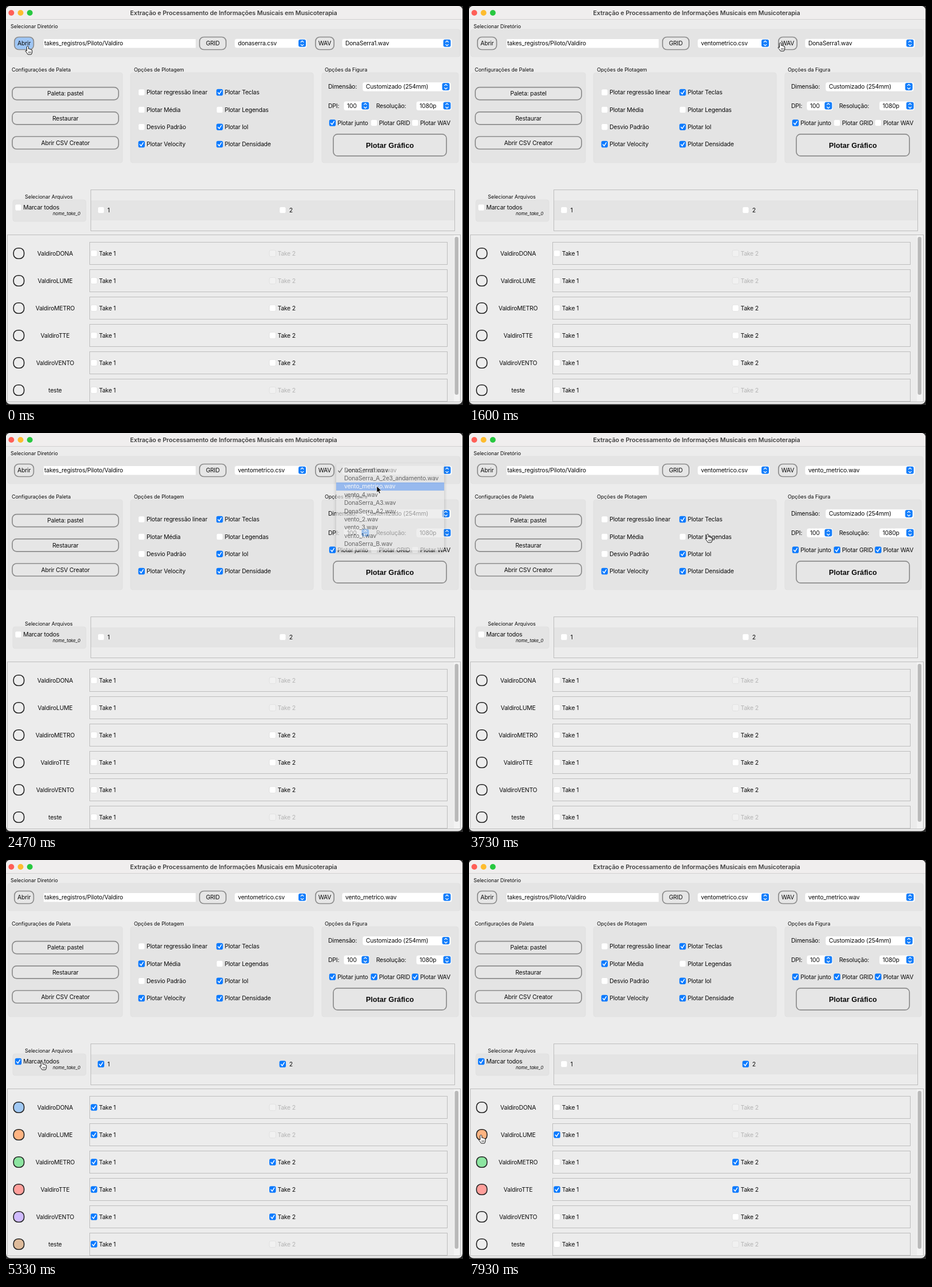
Recreate the animation shown at these times as an HTML page. Size 800 by 700 pixels, loop 8000 ms.

```html
<!DOCTYPE html>
<html lang="pt">
<head>
<meta charset="utf-8">
<style>
  html, body { margin: 0; width: 100%; height: 100%; overflow: hidden; background: #2b2b2b; }
  svg { display: block; }
  text { font: 10.4px Inter, "Open Sans", sans-serif; letter-spacing: -.18px; fill: #0a0a0a; white-space: pre; }
  text.small { font-size: 9px; letter-spacing: -.06px; }
  text.title { font-size: 10.8px; font-weight: 600; letter-spacing: -.1px; fill: #404040; }
  text.note { font-size: 7.8px; font-style: italic; letter-spacing: 0; }
  text.big { font: bold 12.7px "Liberation Sans", Arial, sans-serif; letter-spacing: 0; }
</style>
</head>
<body>
<svg width="800" height="700" viewBox="0 0 800 700">
  <defs>
    <filter id="shade" x="-10%" y="-10%" width="120%" height="125%">
      <feDropShadow dx="0" dy="3" stdDeviation="3" flood-opacity=".3"/>
    </filter>
  </defs>
  <g id="back"></g><g id="live"></g><g id="pointer"></g>
</svg>
<script>
const LOOP = 8000, ROW = 14.35;
const $ = id => document.getElementById(id);
const SIZES = { small: 9, title: 10.8, note: 7.8, big: 12.7 };

// Drawing helpers; text is placed by the middle of its capitals.
const text = (x, y, s, { cls = '', mid = false, fill = '' } = {}) =>
  `<text x="${x}" y="${y + (SIZES[cls] || 10.4) * .364}" class="${cls}"` +
  `${mid ? ' text-anchor="middle"' : ''}${fill ? ` style="fill:${fill}"` : ''}>${s}</text>`;
const rect = (x, y, w, h, fill, r = 0, more = '') =>
  `<rect x="${x}" y="${y}" width="${w}" height="${h}" rx="${r}" fill="${fill}" ${more}/>`;
const frame = (x, y, w, h) => rect(x + .5, y + .5, w, h, 'none', 0, 'stroke="#bdbdbd"');
const group = (x, y, w, h) => rect(x, y, w, h, '#e4e4e4', 4, 'stroke="#dfdfdf" stroke-width=".7"');
const button = (x, y, w, h, label, fill = '#e6e6e6', cls = '') =>
  rect(x, y, w, h, fill, 7.5, 'stroke="#8c8c8c" stroke-width="1.7"') +
  text(x + w / 2, y + h / 2, label, { mid: true, cls });
const combo = (x, y, w, label, knob) =>
  rect(x, y - 8, w, 16.5, '#fff', 4, 'stroke="#dedede" stroke-width=".6"') + text(x + 6, y, label) +
  rect(knob - 6.5, y - 6.5, 13, 13, '#147efb', 3.2) +
  `<path d="M${knob - 2.6} ${y - 1.6}l2.6-2.6 2.6 2.6m-5.2 3.4l2.6 2.6 2.6-2.6" fill="none" stroke="#fff" stroke-width="1.3"/>`;
const check = (x, y, on, label, gap = 8.7, off = false) =>
  rect(x - 5.7, y - 5.7, 11.4, 11.4, on ? '#0a7aff' : off ? '#f1f1f1' : '#fff', 2.8,
    on ? '' : 'stroke="#dcdcdc" stroke-width=".7"') +
  (on ? `<path d="M${x - 2.8} ${y + .4}l2.1 2.5 3.7-5.7" fill="none" stroke="#fff" stroke-width="1.5" stroke-linecap="round"/>` : '') +
  text(x + gap, y, label, { fill: off ? '#b4b4b4' : '' });

// Pointer path: time, x, y, shape
const PATH = [
  [0, 38, 70, 'hand'], [130, 38, 70, 'hand'], [230, 90, 72, 'arrow'], [650, 440, 66, 'arrow'],
  [870, 440, 66, 'arrow'], [1000, 440, 79, 'arrow'], [1130, 440, 94, 'arrow'], [1330, 440, 94, 'arrow'],
  [1540, 541, 64, 'hand'], [1600, 545, 64, 'hand'], [1680, 575, 65, 'arrow'], [1930, 649, 66, 'arrow'],
  [2130, 649, 66, 'arrow'], [2330, 649, 93, 'arrow'], [2560, 649, 93, 'arrow'], [2720, 648, 204, 'hand'],
  [2860, 652, 205, 'hand'], [3000, 700, 205, 'hand'], [3130, 725, 205, 'hand'], [3420, 725, 205, 'hand'],
  [3730, 418, 177, 'hand'], [4200, 265, 174, 'hand'], [4400, 275, 175, 'hand'], [4500, 262, 185, 'arrow'],
  [4930, 48, 395, 'arrow'], [5110, 63, 353, 'hand'], [5400, 63, 353, 'hand'], [5680, 168, 356, 'hand'],
  [5830, 168, 356, 'hand'], [6030, 486, 354, 'hand'], [6270, 490, 356, 'hand'], [6330, 496, 359, 'cross'],
  [6470, 496, 359, 'hand'], [6600, 536, 376, 'arrow'], [6870, 26, 616, 'hand'], [6990, 23, 640, 'arrow'],
  [7090, 22, 625, 'hand'], [7200, 22, 625, 'hand'], [7360, 22, 579, 'hand'], [7530, 22, 579, 'hand'],
  [7730, 21, 518, 'hand'], [7880, 21, 482, 'hand'], [LOOP, 21, 482, 'hand']
];
const SHAPES = {
  hand: '<path d="M-1.6 1.5Q0-.9 1.5 1.5V5.4Q3.1 4.5 3.8 5.9 5.4 5.2 5.8 6.7 7.7 6.3 7.7 8.3V11Q7.5 13 6.2 15H.3Q-1.4 12-4 9.3-4.2 7.3-1.6 8.9Z" fill="#fff" stroke="#111" stroke-width="1"/>' +
    '<path d="M1.6 9.8v3m1.8-3v3m1.8-3v3" stroke="#111" stroke-width=".7"/>',
  arrow: '<path d="M0 0V11.6L2.6 9.2 4.4 13.3 6.4 12.4 4.6 8.5H8.2Z" fill="#000" stroke="#fff" stroke-width=".8"/>',
  cross: '<path d="M-5.5 0H5.5M0-5.5V5.5" stroke="#fff" stroke-width="2"/><path d="M-5.5 0H5.5M0-5.5V5.5" stroke="#222" stroke-width="1"/>'
};
function pointerAt(t) {
  const i = PATH.findIndex(k => k[0] > t);
  const [t0, x0, y0, shape] = PATH[i - 1], [t1, x1, y1] = PATH[i];
  const u = (t - t0) / (t1 - t0), e = u * u * (3 - 2 * u);
  return { x: x0 + (x1 - x0) * e, y: y0 + (y1 - y0) * e, shape };
}

const CSV = ['donaserra.csv', 'andamento.csv', 'ventometrico.csv', 'metronomo.csv'];
const WAV = ['DonaSerra1.wav', 'DonaSerra_A_2e3_andamento.wav', 'vento_metrico.wav', 'vento_4.wav',
  'DonaSerra_A3.wav', 'DonaSerra_A2.wav', 'vento_2.wav', 'vento_3.wav', 'vento_1.wav', 'DonaSerra_B.wav'];

// A pop-up list that follows the pointer, then fades once an item is chosen.
function menu(t, x, w, items, open, close, fade) {
  if (t < open || t >= close + fade) return '';
  const alpha = Math.min(1, 1 - (t - close) / fade);
  const pick = Math.round((pointerAt(Math.min(t, close)).y - 65) / ROW);
  const ink = i => i === pick ? '#fff' : '#222';
  return `<g opacity="${alpha.toFixed(3)}">` +
    rect(x, 53.5, w, items.length * ROW + 9, '#e6e6e6', 4, 'filter="url(#shade)"') +
    rect(x, 58 + pick * ROW, w, ROW, '#6a9ff0') +
    items.map((s, i) => text(x + 14, 65 + i * ROW, s, { fill: ink(i) })).join('') +
    `<path d="M${x + 3.5} 66l2.5 3 5-8" fill="none" stroke="${ink(0)}" stroke-width="1.2"/></g>`;
}

const ROWS = [
  ['ValdiroDONA', '#a1c9f4'], ['ValdiroLUME', '#ffb482'], ['ValdiroMETRO', '#8de5a1'],
  ['ValdiroTTE', '#ff9f9b'], ['ValdiroVENTO', '#d0bbff'], ['teste', '#debb9b']
];
const rowY = i => 434 + 48 * i;

$('back').innerHTML =
  rect(0, 0, 799, 698.5, '#ececec', 8) +
  '<path d="M0 23V8Q0 0 8 0H791Q799 0 799 8V23Z" fill="#f0eeee"/>' + rect(0, 23, 799, 1, '#d2d0d0') +
  ['#ff5f57', '#febc2e', '#28c840'].map((c, i) => `<circle cx="${9.3 + 16.2 * i}" cy="12" r="5" fill="${c}"/>`).join('') +
  text(398.5, 12, 'Extração e Processamento de Informações Musicais em Musicoterapia', { cls: 'title', mid: true }) +
  [[8, 35.5, 'Selecionar Diretório'], [10, 111.5, 'Configurações de Paleta'], [224, 111.5, 'Opções de Plotagem'],
   [558, 111.5, 'Opções da Figura'], [33, 334.5, 'Selecionar Arquivos']]
    .map(([x, y, s]) => text(x, y, s, { cls: 'small' })).join('') +
  group(3, 41, 792, 48) + group(4, 117, 200, 158) + group(218, 117, 320, 158) +
  group(553, 117, 239, 158) + group(12, 340, 128, 38) +
  rect(66, 58, 266, 15.5, '#fff') + text(67, 65.5, 'takes_registros/Piloto/Valdiro') +
  button(338.8, 54.5, 46.4, 22, 'GRID') + button(541.8, 54.5, 32.4, 22, 'WAV') +
  ['Paleta: pastel', 'Restaurar', 'Abrir CSV Creator'].map((s, i) => button(11, 142.6 + 43.2 * i, 186, 22, s)).join('') +
  text(564, 141.5, 'Dimensão:') + combo(624, 141.5, 155, 'Customizado (254mm)', 770) +
  text(564, 175, 'DPI:') + combo(591, 175, 46, '100', 629) +
  text(648, 175, 'Resolução:') + combo(718, 175, 62, '1080p', 772) +
  button(573, 224.8, 198, 38.4, 'Plotar Gráfico', '#e6e6e6', 'big') +
  text(82, 364, 'nome_take_0', { cls: 'note' }) +
  rect(149, 341, 636, 35, '#e4e4e4') + frame(148, 322, 637, 72) +
  frame(2, 401, 793, 293) + rect(784, 402, 10.5, 292, '#f3f3f3') + rect(785.5, 405, 6.5, 277, '#b9b9b9', 3.2) +
  ROWS.map(([name], i) => frame(146, rowY(i) - 20, 626, 39) + text(86, rowY(i), name, { mid: true })).join('');

function live(t) {
  const marked = t >= 5190, one = marked && t < 5800, two = marked && t < 6200 || t >= 6460;
  const options = [
    [237.3, 151.5, 'Plotar regressão linear', false], [237.3, 182, 'Plotar Média', t >= 4320],
    [237.3, 212.2, 'Desvio Padrão', false], [237.3, 242.5, 'Plotar Velocity', true],
    [374, 151.5, 'Plotar Teclas', true], [374, 182, 'Plotar Legendas', false],
    [374, 212.2, 'Plotar IoI', true], [374, 242.5, 'Plotar Densidade', true],
    [571.5, 205, 'Plotar junto', true], [644.3, 205, 'Plotar GRID', t >= 2790],
    [716.2, 205, 'Plotar WAV', t >= 3260], [21.5, 353.5, 'Marcar todos', marked]
  ];
  const rows = ROWS.map(([, color], i) => {
    const y = rowY(i), second = i > 1 && i < 5;
    const a = one || i === 3 && t >= 7450 || i === 1 && t >= 7915;
    const b = second && two && !(i === 4 && t >= 7140);
    return rect(13.2, y - 9.2, 18.4, 18.4, a || b ? color : '#ededed', 7.8, 'stroke="#222" stroke-width="1.6"') +
      check(154, y, a, 'Take 1') + check(466.7, y, b, 'Take 2', 8.7, !second);
  });
  return button(14.8, 54.5, 33.6, 22, 'Abrir', t < 190 ? '#9fc6f5' : '#e6e6e6') +
    combo(400, 65.3, 127, CSV[t < 1260 ? 0 : 2], 518.5) +
    combo(588, 65.3, 193, WAV[t < 2400 ? 0 : 2], 772) +
    options.map(([x, y, s, on]) => check(x, y, on, s)).join('') +
    check(166.3, 358, one, '1', 11.3) + check(484.3, 358, two, '2', 11.5) + rows.join('') +
    menu(t, 389, 124, CSV, 730, 1260, 140) + menu(t, 578, 189, WAV, 2000, 2400, 200);
}

let start, shown, shape;
function tick(now) {
  start ??= now;
  const t = (now - start) % LOOP, scene = live(t), p = pointerAt(t);
  if (scene !== shown) $('live').innerHTML = shown = scene;
  if (p.shape !== shape) $('pointer').innerHTML = SHAPES[shape = p.shape];
  $('pointer').setAttribute('transform', `translate(${p.x.toFixed(2)} ${p.y.toFixed(2)})`);
  requestAnimationFrame(tick);
}
requestAnimationFrame(tick);
</script>
</body>
</html>
```
